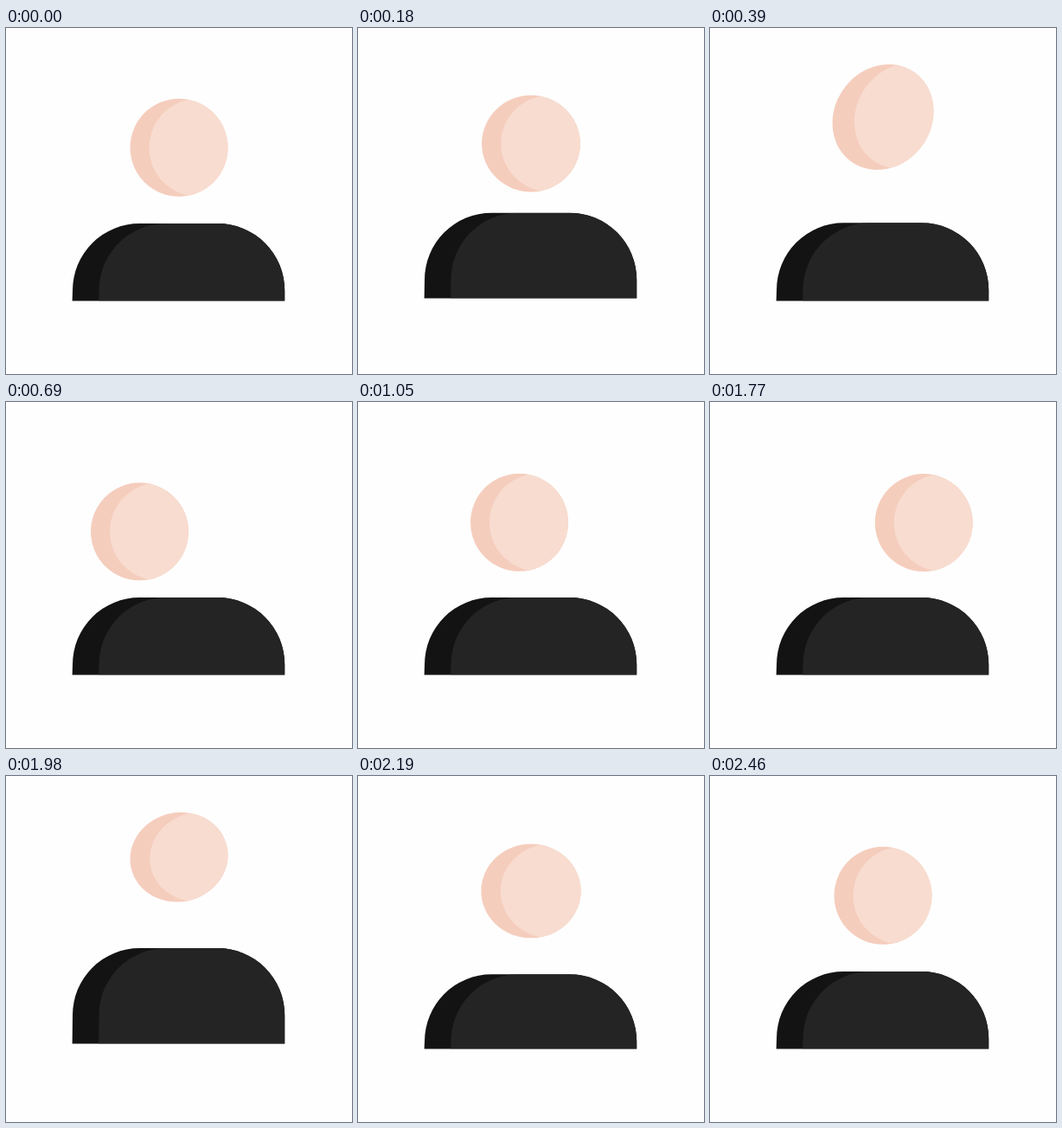
Recreate the animation shown at these times as an HTML page. Size 400 by 400 pixels, loop 2.55 s.

```html
<!DOCTYPE html>
<html lang="en">
<head>
<meta charset="utf-8">
<title>Hopping figure</title>
<style>
  html, body { margin: 0; width: 100%; height: 100%; overflow: hidden; background: #fefefe; }
  svg { display: block; width: 100%; height: 100%; }
</style>
</head>
<body>
<svg viewBox="0 0 400 400">
  <defs>
    <clipPath id="headClip"><circle r="56.5"/></clipPath>
    <clipPath id="bodyClip"><path class="torso"/></clipPath>
  </defs>
  <path class="torso" fill="#131313"/>
  <g clip-path="url(#bodyClip)">
    <path class="torso" fill="#242424" transform="translate(30.5 0)"/>
  </g>
  <g id="head">
    <circle r="56.5" fill="#f5cdbd"/>
    <g clip-path="url(#headClip)"><circle id="light" r="56.5" fill="#f8dcd0"/></g>
  </g>
</svg>
<script>
const LOOP = 2550, STEP = 30;

// Smooth 0 to 1 between two times
function glide(t, from, to) {
  const u = Math.min(1, Math.max(0, (t - from) / (to - from)));
  return (1 - Math.cos(Math.PI * u)) / 2;
}

// Smooth hump of height 1 around a time
const pulse = (t, centre, reach) => 1 - glide(Math.abs(t - centre), 0, reach);

function torsoPath(top, bottom) {
  const left = 77, right = 322.2, r = 77.5, shoulder = top + r;
  return `M${left - 0.4} ${bottom}L${left} ${shoulder}` +
    `A${r} ${r} 0 0 1 ${left + r} ${top}H${right - r}` +
    `A${r} ${r} 0 0 1 ${right} ${shoulder}V${bottom}Z`;
}

const head = document.getElementById("head");
const light = document.getElementById("light");
const torsos = document.querySelectorAll(".torso");

function draw(t) {
  // The body crouches before and after each of its two hops
  const crouch = [110, 500, 1640, 2220].reduce((sum, at) => sum + pulse(t, at, 110), 0);
  const hop = pulse(t, 255, 150) + pulse(t, 1980, 150);
  const d = torsoPath(226 - 27 * hop + 4 * crouch, 315.6 - 6 * hop);
  torsos.forEach(path => path.setAttribute("d", d));

  // The head is thrown up, lands left, rolls right and is thrown back to the middle
  const fall = pulse(t, 390, 130);
  const roll = pulse(t, 1230, 110);
  const peak = pulse(t, 1980, 110);
  const lift = 42 * pulse(t, 335, 210) + 44.5 * pulse(t, 1980, 315);
  const shift = -45.5 * glide(t, 390, 570) + 92.7 * glide(t, 930, 1230)
    - 47.2 * glide(t, 1770, 1980);
  const x = 200 + shift + 2.8 * roll;
  const y = 138.3 + 11.8 * (shift / 46) ** 2 - lift + 7 * crouch;

  const width = 1 + 0.033 * fall - 0.065 * roll + 0.025 * crouch;
  const height = 1 + 0.077 * fall - 0.083 * peak - 0.045 * crouch;
  const lean = -0.06 * fall + 0.032 * roll - 0.021 * peak;
  head.setAttribute("transform", `matrix(${width} ${lean} ${lean} ${height} ${x} ${y})`);
  light.setAttribute("cx", 22 - 40 * lean);
}

const start = performance.now();
function tick() {
  const t = (performance.now() - start) % LOOP;
  draw(Math.floor(t / STEP) * STEP);
  requestAnimationFrame(tick);
}
tick();
</script>
</body>
</html>
```
